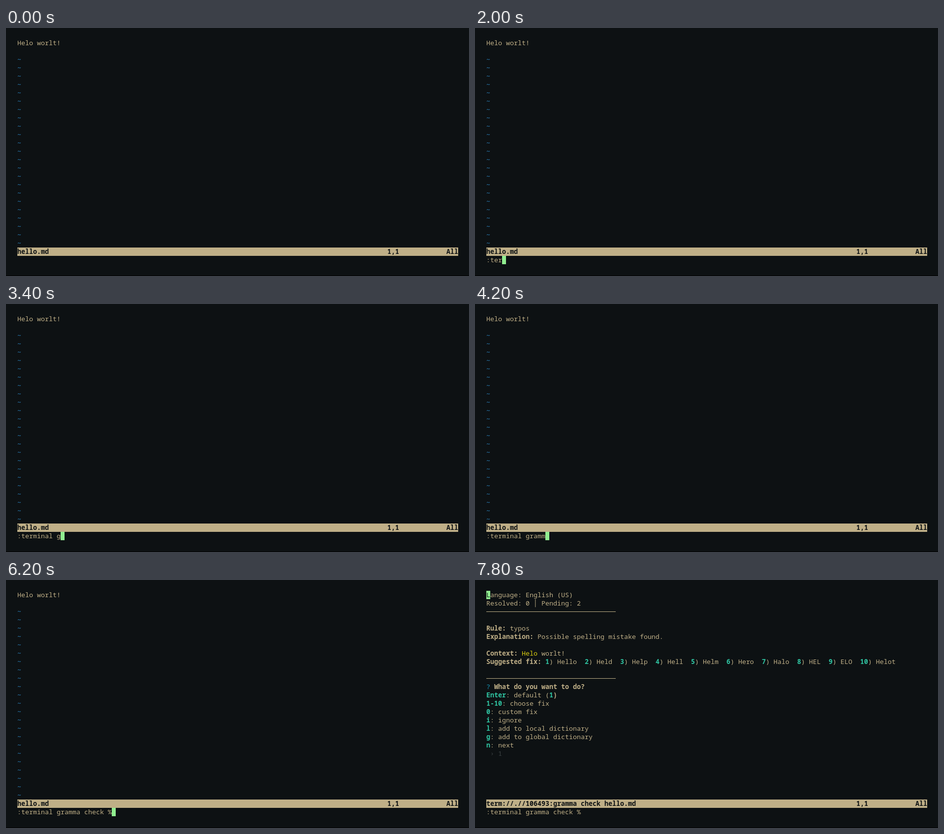
An HTML page that plays this animation: 941x505 px, repeating every 8000 ms.

```html
<!DOCTYPE html>
<html lang="en">
<head>
<meta charset="utf-8">
<title>Terminal grammar check</title>
<style>
  :root { --bg: #0d1113; --fg: #bfaf87; --cursor: #90ee90; }
  html, body { margin: 0; width: 100%; height: 100%; overflow: hidden; background: var(--bg); }
  #term {
    position: absolute; left: 0; top: 0; width: 941px; height: 505px; overflow: hidden;
    background: var(--bg); color: var(--fg);
    font: 13.3333px/17px "Noto Sans Mono", "DejaVu Sans Mono", monospace;
    border-bottom: 1px solid #000; box-sizing: border-box;
  }
  .row { position: absolute; left: 23px; width: 896px; height: 17px; white-space: pre; }
  #status { top: 447px; background: var(--fg); color: var(--bg); font-weight: 700; }
  #status span { position: absolute; top: 0; }
  #name { left: 0; }
  #pos { left: 752px; }
  #all { left: 872px; }
  #command { top: 464px; }
  #cursor {
    position: absolute; width: 8px; height: 17px; white-space: pre;
    background: var(--cursor); color: var(--bg);
  }
  b { font-weight: 700; }
  .tilde { color: #2f8fd0; }
  .key { color: #2fc4a2; }
  .typo { color: #d8cc10; }
  .ask { color: #179bbd; }
  .hint { color: #3b4143; }
  .dots { letter-spacing: -2px; margin-left: 2px; }
  .rule { position: absolute; left: 0; top: 8px; width: 263px; height: 1px; background: var(--fg); }
</style>
</head>
<body>
<div id="term">
  <div id="screen"></div>
  <div id="status" class="row"><span id="name"></span><span id="pos"></span><span id="all">All</span></div>
  <div id="command" class="row"></div>
  <div id="cursor"></div>
</div>
<script>
const LOOP = 8000;
const COMMAND = ":terminal gramma check %";
const KEY_TIMES = [
  1100, 1600, 1800, 2000, 2200, 2300, 2500, 2700, 2900, 3100, 3400, 3600,
  3800, 4000, 4200, 4300, 4400, 4700, 4800, 4900, 5200, 5400, 5600, 6200
];

const $ = id => document.getElementById(id);
const bold = s => `<b>${s}</b>`;
const key = s => `<b class="key">${s}</b>`;
const tint = (cls, s) => `<span class="${cls}">${s}</span>`;
const rule = tint("rule", "");

const fixes = ["Hello", "Held", "Help", "Hell", "Helm", "Hero", "Halo", "HEL", "ELO", "Helot"]
  .map((word, i) => `${key(i + 1)}) ${word}`).join("  ");

const editor = ["Helo worlt!", "", ...Array(23).fill(tint("tilde", "~"))];
const checking = ["Checking via https://api.languagetool.org/v2/check" + tint("dots", "...")];
const report = [
  "Language: English (US)",
  "Resolved: 0 │ Pending: 2",
  rule,
  "",
  bold("Rule:") + " typos",
  bold("Explanation:") + " Possible spelling mistake found.",
  "",
  `${bold("Context:")} ${tint("typo", "Helo")} worlt!`,
  `${bold("Suggested fix:")} ${fixes}`,
  "",
  rule,
  `${tint("ask", "?")} ${bold("What do you want to do?")}`,
  `${key("Enter")}: default (${key(1)}${bold(")")}`,
  key("1-10") + ": choose fix",
  key("0") + ": custom fix",
  key("i") + ": ignore",
  key("l") + ": add to local dictionary",
  key("g") + ": add to global dictionary",
  key("n") + ": next"
];
const prompt = tint("hint", " › 1");

const FILE = "hello.md";
const JOB = "term://.//106493:gramma check hello.md";

// Cursor is [column, row, covered character], or null while blinked off.
function stateAt(t) {
  const typed = KEY_TIMES.filter(k => k <= t).length;
  const state = { lines: editor, name: FILE, pos: "1,1", command: COMMAND.slice(0, typed), cursor: null };
  if (t < 6600) {
    if (typed) state.cursor = [typed, 26, ""];
    else if (t >= 500) state.cursor = [0, 0, "H"];
    return state;
  }
  state.name = JOB;
  if (t < 6900) {
    state.lines = [];
    state.pos = "0,0-1";
    state.cursor = [0, 0, ""];
  } else if (t < 7700) {
    state.lines = checking;
    if (t < 7300) state.cursor = [0, 0, "C"];
  } else if (t < 7800) {
    state.lines = report;
  } else {
    state.lines = [...report, prompt];
    state.cursor = [0, 0, "L"];
  }
  return state;
}

function draw({ lines, name, pos, command, cursor }) {
  $("screen").innerHTML = lines
    .map((s, i) => `<div class="row" style="top:${22 + 17 * i}px">${s}</div>`).join("");
  $("name").textContent = name;
  $("pos").textContent = pos;
  $("command").textContent = command;
  const block = $("cursor");
  block.hidden = !cursor;
  if (cursor) {
    const [col, row, char] = cursor;
    block.style.left = 23 + 8 * col + "px";
    block.style.top = 22 + 17 * row + "px";
    block.textContent = char;
  }
}

const start = performance.now();
let shown = "";

function tick() {
  const state = stateAt((performance.now() - start) % LOOP);
  const id = JSON.stringify(state);
  if (id !== shown) {
    shown = id;
    draw(state);
  }
  requestAnimationFrame(tick);
}
tick();
</script>
</body>
</html>
```
